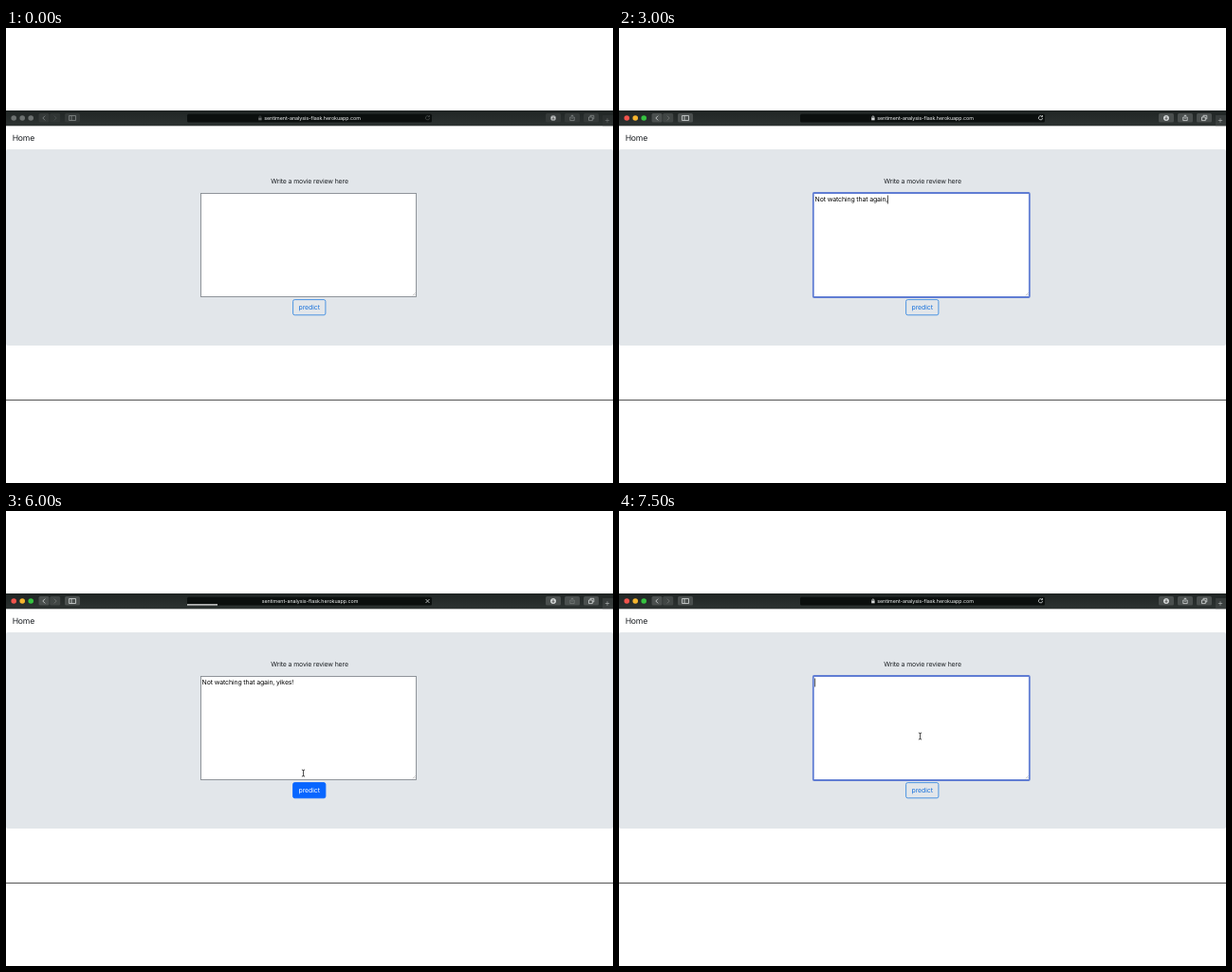
Recreate the animation shown at these times as an HTML page. Size 640x480 px, loop 8 s.

```html
<!DOCTYPE html>
<html lang="en">
<head>
<meta charset="utf-8">
<style>
html, body { margin: 0; width: 100%; height: 100%; overflow: hidden; background: #fff; }
svg { display: block; width: 640px; height: 480px; }
text { font: 6.95px Inter, "Liberation Sans", sans-serif; letter-spacing: -.13px; fill: #1b1f23; text-rendering: geometricPrecision; white-space: pre; }
.mid { text-anchor: middle; }
.icon { fill: none; stroke: #d5d8d8; stroke-width: .8; }
.key { fill: #4a4f4e; }
.idle .key { fill: #343938; }
.idle .icon { stroke: #858a8a; }
.idle .light { fill: #6c7170; }
.idle #reload, .idle #lock { opacity: .45; }
.busy #share { opacity: .3; }
#home { font-size: 8.6px; letter-spacing: -.2px; }
#url { font-size: 5.35px; letter-spacing: -.04px; fill: #f2f4f4; }
#verdict { font-size: 13.3px; font-weight: 500; letter-spacing: -.2px; }
#verdict, #score { fill: #d2232f; }
#again { font-size: 8.2px; letter-spacing: -.15px; fill: #111; }
#label { letter-spacing: -.08px; }
#typed { fill: #000; }
</style>
</head>
<body>
<svg viewBox="0 0 640 480">
  <defs>
    <linearGradient id="bar" x2="0" y2="1"><stop stop-color="#202524"/><stop offset="1" stop-color="#2d3332"/></linearGradient>
    <linearGradient id="grey" x2="0" y2="1"><stop stop-color="#e6e6e6"/><stop offset="1" stop-color="#f3f3f3"/></linearGradient>
  </defs>

  <g id="chrome">
    <rect y="87" width="640" height="16.3" fill="url(#bar)"/>
    <circle class="light" cx="8.2" cy="95" r="2.8" fill="#f2544d"/>
    <circle class="light" cx="17.2" cy="95" r="2.8" fill="#f5b52e"/>
    <circle class="light" cx="26.2" cy="95" r="2.8" fill="#35c240"/>
    <g class="key">
      <rect x="34.5" y="90" width="11" height="9.6" rx="1.5"/>
      <rect x="46.2" y="90" width="11" height="9.6" rx="1.5" opacity=".75"/>
      <rect x="62" y="90" width="16" height="9.6" rx="1.5"/>
      <rect x="569" y="90" width="16" height="9.6" rx="1.5"/>
      <rect x="589" y="90" width="16" height="9.6" rx="1.5"/>
      <rect x="609" y="90" width="16" height="9.6" rx="1.5"/>
      <rect x="629" y="92" width="11" height="11.3" opacity=".5"/>
    </g>
    <g class="icon">
      <path d="M41.2 92.6L38.8 95L41.2 97.4"/>
      <path d="M50.8 92.6L53.2 95L50.8 97.4" opacity=".35"/>
      <path d="M66.5 92.5h7v5h-7zM69 92.5v5"/>
      <circle cx="577" cy="95" r="2.6" fill="#d5d8d8"/>
      <path d="M577 93.3v3M575.8 95.2l1.2 1.2l1.2-1.2" stroke="#333"/>
      <path id="share" d="M595.8 94h-1v3.6h4.4V94h-1M597 96v-4M595.8 93l1.2-1.2l1.2 1.2"/>
      <path d="M614.5 94h3.8v3.6h-3.8zM616 94v-1.7h3.8v3.6h-1.5"/>
      <path d="M634 95.3v4.4M631.8 97.5h4.4" opacity=".6"/>
    </g>
    <rect x="191" y="90.8" width="258" height="8.6" rx="1.5" fill="#0b0f0e"/>
    <g id="lock"><rect x="266.2" y="94.6" width="3.4" height="2.7" fill="#d5d8d8"/><path class="icon" d="M266.9 94.8v-.9a1 1 0 0 1 2 0v.9" stroke-width=".6"/></g>
    <path id="reload" class="icon" d="M446 93.3a2.1 2.1 0 1 0 .6 1.7M446.5 92v1.7h-1.7" stroke-width=".6"/>
    <path id="stop" class="icon" d="M442.5 93l4 4M446.5 93l-4 4" stroke-width=".6"/>
    <rect id="progress" x="191" y="98.3" height="1.2" fill="#fff"/>
    <text id="url" class="mid" y="97">sentiment-analysis-flask.herokuapp.com</text>
  </g>

  <text id="home" x="6.7" y="119">Home</text>
  <path d="M0 392.5H640" stroke="#555"/>

  <g id="form">
    <rect y="128" width="640" height="207" rx="2" fill="#e2e6ea"/>
    <text class="mid" x="320" y="164.4">Write a movie review here</text>
    <rect id="area" fill="#fff"/>
    <path d="M428.6 282.4l3-3M430.3 282.4l1.3-1.3" stroke="#999" stroke-width=".5"/>
    <text id="typed" x="206.6" y="183.4"></text>
    <rect id="caret" y="176.5" width=".8" height="9" fill="#222"/>
    <rect id="button" x="302.6" y="286.6" width="34.3" height="16.2" rx="1.8"/>
    <text id="label" class="mid" x="319.7" y="297.3">predict</text>
  </g>

  <g id="result">
    <rect y="128" width="640" height="113" rx="2" fill="#e2e6ea"/>
    <text class="mid" x="319.7" y="164.4">Sentiment prediction for the text</text>
    <text id="verdict" class="mid" x="319.7" y="188">Negative</text>
    <text id="score" class="mid" x="319.8" y="202.5">(score: 0.42)</text>
    <rect x=".4" y="255.4" width="639.2" height="20.2" rx="2" fill="url(#grey)" stroke="#b4b4b4" stroke-width=".8"/>
    <text id="again" class="mid" x="319.7" y="268.4">Try another sentence</text>
  </g>

  <path id="beam" d="M-1.6-3.5Q0-3.5 0-2.5Q0-3.5 1.6-3.5M0-2.8V2.8M-1.6 3.5Q0 3.5 0 2.5Q0 3.5 1.6 3.5" fill="none" stroke="#222" stroke-width=".8"/>
  <path id="arrow" d="M0 0V7L1.6 5.6L2.7 8L3.8 7.5L2.8 5.2H5z" fill="#111" stroke="#fff" stroke-width=".5"/>
  <path id="hand" d="M-.8-3.6q.7-.7 1.3 0V-.8l2.6.6q.7.3.5 1.2L3 4H-.7L-3 .9q.2-.9 1.1-.4l1.1.7z" fill="#fff" stroke="#222" stroke-width=".7"/>
</svg>
<script>
const $ = id => document.getElementById(id);
const set = (el, attrs) => { for (const k in attrs) el.setAttribute(k, attrs[k]); };
const show = (id, on) => $(id).setAttribute("visibility", on ? "visible" : "hidden");

const STEP = 500;
const REVIEW = "Not watching that again, yikes!";
const full = REVIEW.length;
const waiting = { chars: full, hover: true, cursor: ["arrow", 309, 299.5] };

// One state per half second; chars = typed letters, load = progress width
const states = [
  { idle: true },
  { cursor: ["beam", 323.5, 249] },
  { focus: true, cursor: ["beam", 323.5, 249] },
  { focus: true, chars: 3, caret: true },
  { focus: true, chars: 12, caret: true },
  { focus: true, chars: 17, caret: true },
  { focus: true, chars: 24, caret: true },
  { focus: true, chars: full, cursor: ["arrow", 368, 324] },
  { ...waiting, focus: true },
  { ...waiting, load: 30 },
  { ...waiting, load: 31 },
  { ...waiting, load: 31.5 },
  { ...waiting, load: 32, cursor: ["beam", 313.5, 276.5] },
  { result: true, cursor: ["hand", 318.3, 271.5] },
  { cursor: ["beam", 318, 270] },
  { focus: true, caret: true, cursor: ["beam", 317.5, 237.5] }
];

function draw(s) {
  const busy = !!s.load;
  $("chrome").setAttribute("class", s.idle ? "idle" : busy ? "busy" : "");
  set($("url"), { x: busy ? 320.5 : 323 });
  set($("progress"), { width: s.load || 0 });
  show("lock", !busy);
  show("reload", !busy);
  show("stop", busy);

  $("form").style.display = s.result ? "none" : "";
  $("result").style.display = s.result ? "" : "none";
  set($("area"), s.focus
    ? { x: 204.8, y: 174, width: 228, height: 110, rx: 1, stroke: "#607dd3", "stroke-width": 1.8 }
    : { x: 205.5, y: 174.5, width: 227, height: 109, rx: 0, stroke: "#858b91", "stroke-width": .9 });
  $("typed").textContent = REVIEW.slice(0, s.chars || 0);
  $("caret").style.display = s.caret ? "" : "none";
  if (s.caret) set($("caret"), { x: 206.3 + (s.chars ? $("typed").getComputedTextLength() : 0) });
  set($("button"), { fill: s.hover ? "#0866ff" : "none", stroke: s.hover ? "#0866ff" : "#3b8be0", "stroke-width": .9 });
  $("label").style.fill = s.hover ? "#fff" : "#1670dc";

  for (const id of ["beam", "arrow", "hand"]) show(id, s.cursor && s.cursor[0] === id);
  if (s.cursor) {
    const [id, x, y] = s.cursor;
    set($(id), { transform: `translate(${x} ${y})` });
  }
}

const start = performance.now();
function tick() {
  const t = performance.now() - start;
  draw(states[Math.floor(t / STEP) % states.length]);
  requestAnimationFrame(tick);
}
tick();
</script>
</body>
</html>
```
